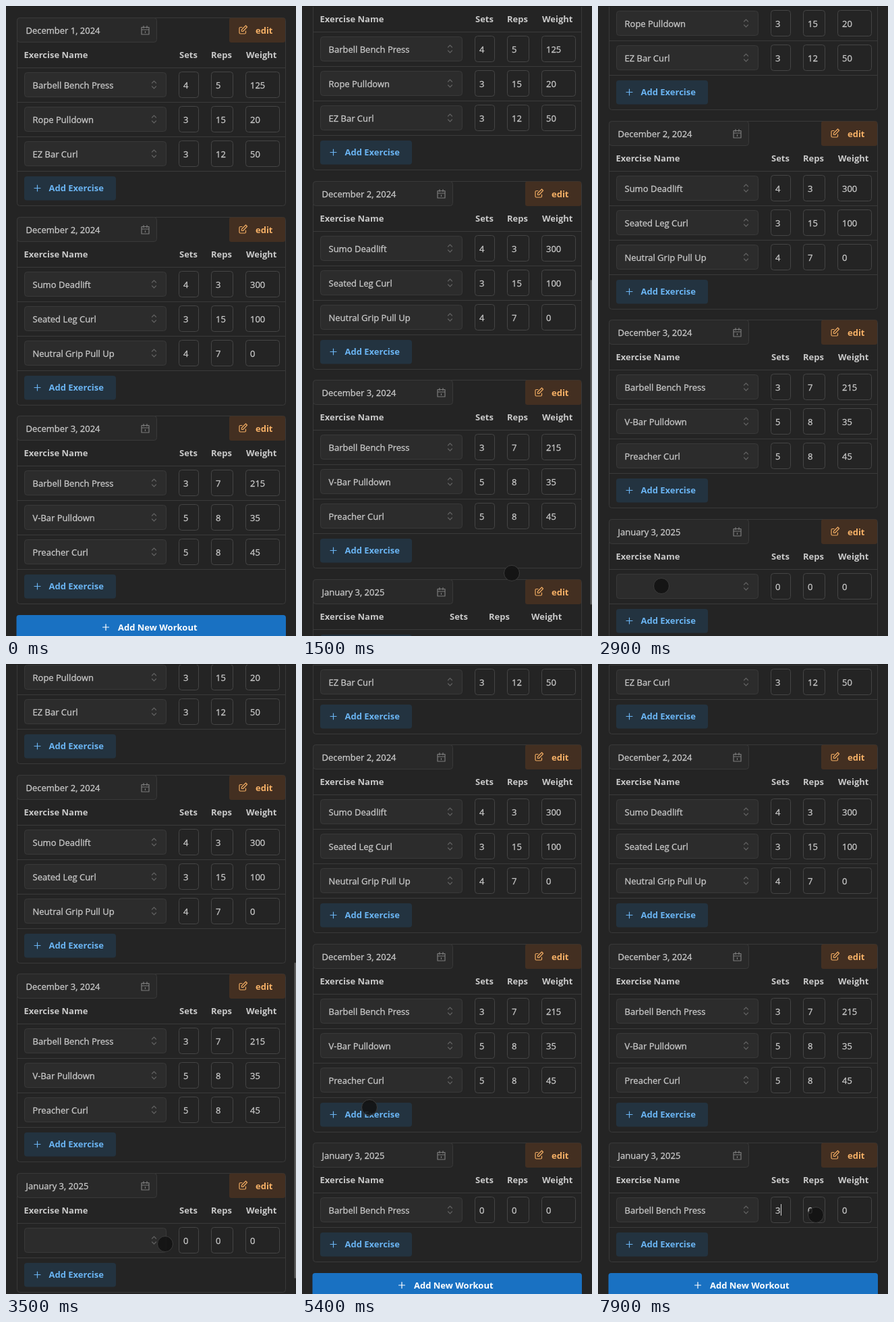
An HTML page for the animation above (8000 ms loop, 430 by 932 pixels).

```html
<!DOCTYPE html>
<html lang="en">
<head>
<meta charset="utf-8">
<title>Workout log</title>
<style>
  html, body { margin: 0; width: 100%; height: 100%; overflow: hidden; background: #242424; }
  svg { display: block; width: 430px; height: 932px; }
  text {
    font: 13px "Open Sans", "Noto Sans", sans-serif; white-space: pre;
    color: #c9c9c9; fill: currentColor; stroke: currentColor; stroke-width: .3;
  }
  .bold { font-weight: 700; stroke: none; }
  .orange { color: #f5b066; }
  .blue { color: #6ab4f2; }
  .white { color: #fff; }
  .label { font-size: 11.2px; color: #808080; }
  .icon { fill: none; stroke-width: 1.2; stroke-linecap: round; stroke-linejoin: round; }
</style>
</head>
<body>
<svg id="stage" viewBox="0 0 430 932"></svg>
<script>
const LOOP = 8000, VIEW = 932, PITCH = 294.5, TOP = 17, ROW = 51;
const ADD_CARD = 1200, ADD_ROW = 2400, OPEN = 4300, PICK = 5300;
const FOCUS = 6700, CLEAR = 7050, TYPE = 7420;
const SCROLL1 = 1361, SCROLL2 = 3448;

const days = [
  ["December 1, 2024", ["Barbell Bench Press", 4, 5, 125], ["Rope Pulldown", 3, 15, 20], ["EZ Bar Curl", 3, 12, 50]],
  ["December 2, 2024", ["Sumo Deadlift", 4, 3, 300], ["Seated Leg Curl", 3, 15, 100], ["Neutral Grip Pull Up", 4, 7, 0]],
  ["December 3, 2024", ["Barbell Bench Press", 3, 7, 215], ["V-Bar Pulldown", 5, 8, 35], ["Preacher Curl", 5, 8, 45]]
];

const text = (x, y, s, cls = "", id = "") => `<text x="${x}" y="${y}" class="${cls}" id="${id}">${s}</text>`;
const box = (x, y, w, h, fill, stroke = "none", r = 4, id = "") =>
  `<rect x="${x}" y="${y}" width="${w}" height="${h}" rx="${r}" fill="${fill}" stroke="${stroke}" id="${id}"/>`;
const icon = (d, color) => `<path class="icon" d="${d}" stroke="${color}"/>`;
const rule = (x1, x2, y) => `<path d="M${x1} ${y}H${x2}" stroke="#3a3a3a"/>`;
const plus = (x, y, color) => icon(`M${x - 4.5} ${y}h9M${x} ${y - 4.5}v9`, color);

function row(y, [name, ...nums], id = "") {
  const cols = [[256.5, 29], [304.5, 32], [355.5, 50]];
  return box(27.5, y - 18, 210, 36, "#2c2c2c", "#393939", 4, id && id + "Box")
    + text(39.5, y + 5, name, "", id && id + "Name")
    + icon(`M216.5 ${y - 2.5}l3-3 3 3M216.5 ${y + 2.5}l3 3 3-3`, "#606060")
    + cols.map(([x, w], i) => box(x, y - 19, w, 38, "#242424", "#454545")
      + text(x + 6.5, y + 5, nums[i], "", id && id + i)).join("")
    + rule(16, 414, y + 26);
}

function card(date, rows, id) {
  const end = 74 + ROW * rows.length;
  const heads = rows.length ? [257, 304, 356] : [219, 277, 340];
  return box(16.5, .5, 398, end + 51, "none", "#393939")
    + box(16.5, .5, 207, 36, "#292929", "#393939")
    + text(29.5, 24, date)
    + icon("M201 14.500h11v10.500h-11zM201 18h11M204 12.500v3M209 12.500v3M206.500 20.500v2", "#7c7c7c")
    + box(331, .5, 83, 36.5, "#432f21", "none", 3)
    + icon("M350 14.500h-2.500q-1.500 0-1.500 1.500v6.500q0 1.500 1.500 1.500h6.500q1.500 0 1.500-1.500v-2.500M349.500 20.500v-2.500l6-6 2 2-6 6.500z", "#f0ab62")
    + text(370, 24, "edit", "bold orange")
    + text(26.5, 60, "Exercise Name", "bold")
    + ["Sets", "Reps", "Weight"].map((s, i) => text(heads[i], 60, s, "bold")).join("")
    + rule(16, 414, 74.5)
    + rows.map((r, i) => row(99.5 + ROW * i, r, id)).join("")
    + box(27, end + 8, 136, 35.5, "#233340")
    + plus(46.5, end + 25.5, "#6ab4f2")
    + text(63.5, end + 30, "Add Exercise", "bold blue");
}

function menu() {
  const group = (s, x, y) => text(41, y + 4, s, "label") + rule(x, 222, y - .5);
  const list = (y, names) => names.map((s, i) => text(41, y + 5 + Math.round(33.7 * i), s)).join("");
  return box(27.5, 371.5, 209, 409, "#2d2d2d", "#3b3b3b")
    + group("Squat", 81, 390)
    + list(422, ["Cyclist Squat", "Sumo Squat", "Barbell Back Squat", "Front Squat", "Hack Squat", "Goblet Squat"])
    + group("Bench Press", 114, 623)
    + list(656, ["Barbell Bench Press", "Incline Barbell Bench Press", "Decline Barbell Bench Press"])
    + group("Deadlift", 92, 755)
    + box(228, 375, 5, 71, "#585858", "none", 2.5);
}

const group = (id, body) => `<g id="${id}">${body}</g>`;
const $ = id => document.getElementById(id);

$("stage").innerHTML = box(0, 0, 430, VIEW, "#242424", "none", 0)
  + days.map(([date, ...rows], i) => group("card" + i, card(date, rows))).join("")
  + group("empty", card("January 3, 2025", []))
  + group("filled", card("January 3, 2025", [["", 0, 0, 0]], "new")
    + `<path id="caret" d="M271.500 91v17" stroke="#d0d0d0"/>`)
  + group("submit", box(15.5, 0, 399.5, 36, "#1971c2") + plus(148, 18, "#fff")
    + text(166, 22.5, "Add New Workout", "bold white"))
  + group("menu", menu())
  + box(427.5, 0, 2.5, 0, "#5e5e5e", "none", 1, "thumb")
  + box(0, 0, 430, 1, "#1c1c1c", "none", 0)
  + `<circle id="cursor" r="11.500" fill="#111" fill-opacity=".86" stroke="#3c3c3c"/>`;

// time, x, y
const path = [
  [900, 250, 946], [1150, 240, 916], [1250, 240, 916], [1420, 311, 839],
  [1800, 311, 839], [2300, 94, 858], [2900, 94, 858], [3400, 236, 858],
  [3750, 236, 858], [4100, 219, 818], [4700, 219, 818], [5200, 100, 656],
  [5800, 100, 656], [6300, 296, 791], [6600, 287, 810], [6700, 287, 810],
  [6800, 272, 810], [7300, 272, 810], [7500, 323, 815], [LOOP, 323, 815]
];

const clamp = u => Math.min(1, Math.max(0, u));
const ease = (t, a, b) => { const u = clamp((t - a) / (b - a)); return u * u * (3 - 2 * u); };
const show = (id, on) => $(id).style.display = on ? "" : "none";
const move = (id, x, y) => $(id).setAttribute("transform", `translate(${x} ${y})`);

function cursorAt(t) {
  const i = Math.max(1, path.findIndex(p => p[0] > t));
  const [a, x, y] = path[i - 1], [b, x2, y2] = path[i];
  const u = ease(t, a, b);
  return [x + (x2 - x) * u, y + (y2 - y) * u];
}

function draw(t) {
  const scroll = 142 * ease(t, SCROLL1, 1700) + 50.5 * ease(t, SCROLL2, 3700);
  const place = (id, y) => move(id, 0, Math.round(y - scroll));
  const last = TOP + 3 * PITCH;
  days.forEach((_, i) => place("card" + i, TOP + i * PITCH));
  place("empty", last);
  place("filled", last);
  show("empty", t >= ADD_CARD && t < ADD_ROW);
  show("filled", t >= ADD_ROW);
  place("submit", last + (t < ADD_CARD ? 0 : t < ADD_ROW ? 141.5 : 192.5));

  const open = t >= OPEN && t < PICK;
  show("menu", open);
  $("newBox").setAttribute("stroke", open ? "#1d62a3" : "#393939");
  $("newName").textContent = t >= PICK ? "Barbell Bench Press" : "";
  $("new0").textContent = t < CLEAR ? "0" : t < TYPE ? "" : "3";
  const since = t - (t < CLEAR ? FOCUS : t < TYPE ? CLEAR : TYPE);
  show("caret", since >= 0 && since % 1000 < 500);
  move("caret", t >= CLEAR && t < TYPE ? -8 : 0, 0);

  // overlay scrollbar; the page continues above the first card
  const height = t < ADD_ROW ? 1809 : 1860;
  const fade = t < 3000 ? [SCROLL1, 2100] : [SCROLL2, 4050];
  $("thumb").setAttribute("y", (734 + scroll) * VIEW / height);
  $("thumb").setAttribute("height", VIEW * VIEW / height);
  $("thumb").setAttribute("opacity", t < fade[0] ? 0 : 1 - clamp((t - fade[1]) / 200));

  show("cursor", t >= 900);
  move("cursor", ...cursorAt(t));
}

function tick() {
  draw(performance.now() % LOOP);
  requestAnimationFrame(tick);
}
tick();
</script>
</body>
</html>
```
